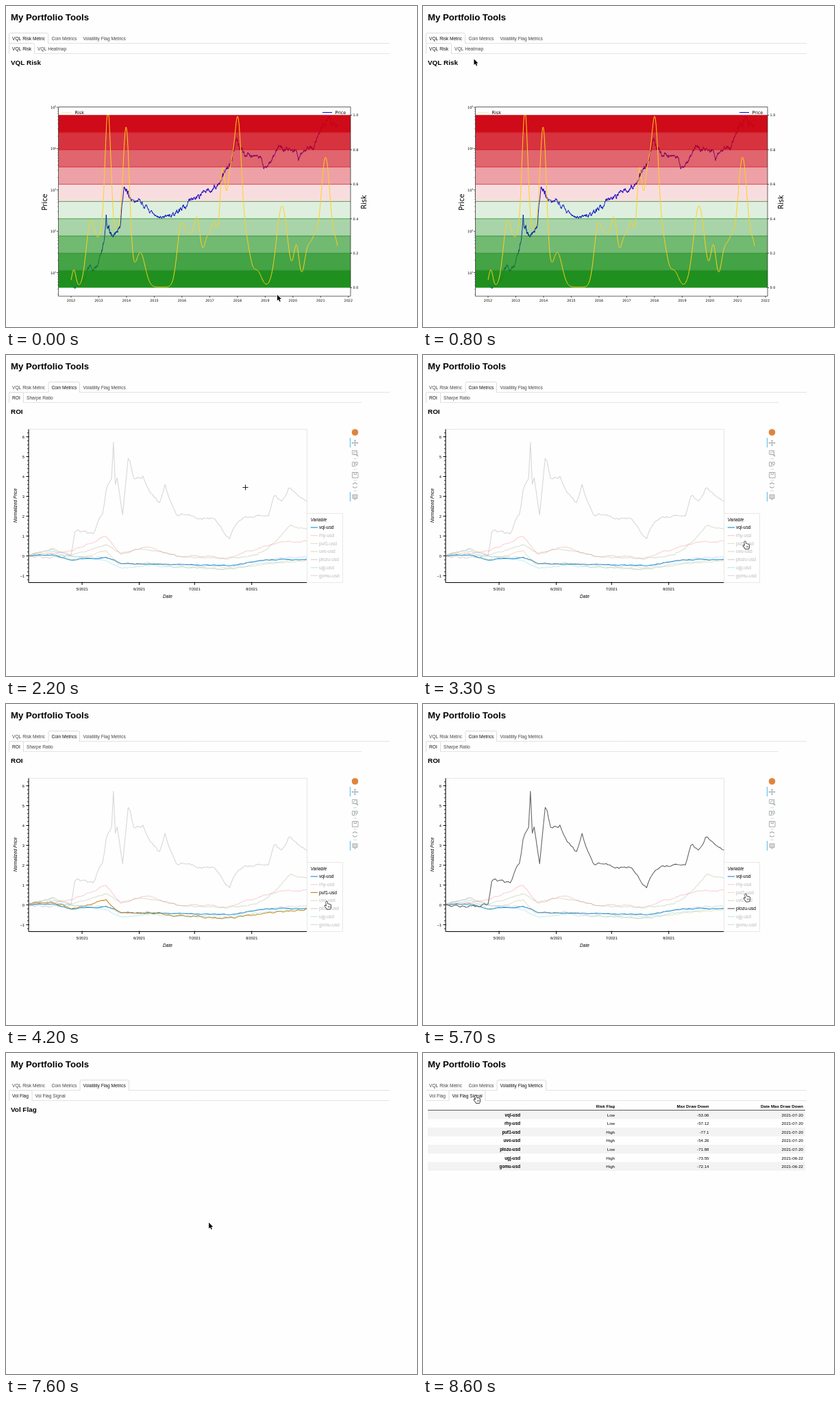
These frames come from a looping animation (600 px wide and 469 px high, 9.4 s). An HTML page with a canvas:

```html
<!DOCTYPE html>
<html lang="en">
<head>
<meta charset="utf-8">
<title>My Portfolio Tools</title>
<style>
  html, body { margin: 0; width: 100%; height: 100%; overflow: hidden; background: #fff; }
  canvas { display: block; width: 600px; height: 469px; }
</style>
</head>
<body>
<canvas id="stage"></canvas>
<script>
const LOOP = 9400, STEP = 100;
const SANS = '"Liberation Sans", Arial, sans-serif';
const PLOT = { font: '"DejaVu Sans", sans-serif' };
const canvas = document.getElementById('stage');
const ctx = canvas.getContext('2d');
const dpr = window.devicePixelRatio || 1;
canvas.width = 600 * dpr;
canvas.height = 469 * dpr;

// ---- helpers ----
const clamp = v => Math.max(0, Math.min(1, v));
const ease = u => u * u * (3 - 2 * u);

function text(s, x, y, size, o = {}) {
  ctx.font = `${o.style || ''} ${size}px ${o.font || SANS}`;
  ctx.textAlign = o.align || 'left';
  ctx.fillStyle = o.color || '#000';
  ctx.fillText(s, x, y);
}
function vtext(s, x, y, size, o) {
  ctx.save();
  ctx.translate(x, y);
  ctx.rotate(-Math.PI / 2);
  text(s, 0, 0, size, { align: 'center', ...o });
  ctx.restore();
}
function path(pts, color, width) {
  ctx.strokeStyle = color;
  ctx.lineWidth = width;
  ctx.lineJoin = 'round';
  ctx.beginPath();
  pts.forEach(([x, y]) => ctx.lineTo(x, y));
  ctx.stroke();
}
function line(x1, y1, x2, y2, color = '#000', width = 1) {
  path([[x1, y1], [x2, y2]], color, width);
}
function rect(x, y, w, h, fill, stroke, width = 1) {
  if (fill) { ctx.fillStyle = fill; ctx.fillRect(x, y, w, h); }
  if (stroke) { ctx.strokeStyle = stroke; ctx.lineWidth = width; ctx.strokeRect(x, y, w, h); }
}
function circle(x, y, r, fill, stroke) {
  ctx.beginPath();
  ctx.arc(x, y, r, 0, 7);
  if (fill) { ctx.fillStyle = fill; ctx.fill(); }
  if (stroke) { ctx.strokeStyle = stroke; ctx.stroke(); }
}
function random(seed) {
  return () => {
    seed = (seed + 0x6d2b79f5) | 0;
    let t = Math.imul(seed ^ (seed >>> 15), 1 | seed);
    t = (t + Math.imul(t ^ (t >>> 7), 61 | t)) ^ t;
    return ((t ^ (t >>> 14)) >>> 0) / 4294967296;
  };
}
// Noise that drifts back to zero; keep sets its memory.
function wander(seed, keep, size) {
  const rnd = random(seed);
  let d = 0;
  return () => d = d * keep + (rnd() - .5) * size;
}
function between(keys, x) {
  let i = 0;
  while (i < keys.length - 2 && x > keys[i + 1][0]) i++;
  const [[x0, y0], [x1, y1]] = [keys[i], keys[i + 1]];
  return y0 + (y1 - y0) * clamp((x - x0) / (x1 - x0));
}

// ---- price and risk ----
// Turning points: years after 2000, log10 of price.
const turns = [
  [12, .73], [12.13, .66], [12.45, .74], [12.62, 1.08], [12.95, 1.13], [13.2, 1.72], [13.27, 2.32],
  [13.31, 2.02], [13.52, 1.9], [13.77, 2.13], [13.91, 3.05], [14.28, 2.66], [14.42, 2.79], [15.03, 2.34],
  [15.66, 2.38], [16.46, 2.82], [17.25, 3.06], [17.72, 3.6], [17.96, 4.26], [18.1, 3.93], [18.86, 3.8],
  [18.95, 3.54], [19.1, 3.56], [19.48, 4.06], [20.12, 3.95], [20.2, 3.72], [20.35, 3.94], [20.75, 4.04],
  [21.02, 4.56], [21.28, 4.78], [21.4, 4.55], [21.61, 4.6]
];
// Risk is a sum of bells: centre x, width, height.
const bells = [
  [99, 3, .1], [123, 6, .36], [138, 7, .26], [149, 4.5, .92], [162, 6, .3], [175.5, 5, .9], [196, 7, .2],
  [256, 6, .36], [268, 5, .23], [279, 5, .38], [293, 5, .25], [304, 5, .35], [316, 4, .62], [327, 5, .57],
  [338.5, 5.5, .92], [351, 6, .24], [367, 6, .09], [403, 8, .47], [424, 4, .23], [440, 5, .2],
  [450, 5, .22], [466.5, 7.3, .75], [483, 5, .2]
];
const riskAt = x => Math.min(1, bells.reduce((s, [c, w, h]) => s + h * Math.exp(-(((x - c) / w) ** 2) / 2), .004));
const yearX = yr => 95 + 40.48 * (yr - 12);
const logY = v => 148 + (5 - v) * 60.4;
const riskY = v => 411.6 - v * 252;

const days = [], jitter = wander(7, .88, .06);
for (let yr = 12; yr < 21.61; yr += 1 / 180) {
  const risk = riskAt(yearX(yr));
  days.push({ yr, risk, y: logY(between(turns, yr) + jitter() * (.7 + risk)) });
}
function jet(v) {
  const c = k => Math.round(255 * clamp(1.5 - Math.abs(4 * v - k)));
  return `rgb(${c(3)},${c(2)},${c(1)})`;
}

// ---- coins ----
const dayX = d => 33 + 2.692 * d;
const stamps = [33, 68, 95, 146, 168, 205, 250, 327, 366, 396, 414, 439];
const shared = ys => ys.map((y, i) => [stamps[i], y]);
const coin = (name, color, sharpe, keys, i) => ({ name, color, sharpe, keys });
const coins = [
  coin('vql-usd', '#1f98d4', -.2, shared([293, 292, 299, 296, 304, 305, 306, 308, 301, 299, 299, 299])),
  coin('rhy-usd', '#f8464e', 1.43, shared([294, 291, 286, 265, 291, 280, 294, 296, 283, 274, 273, 273])),
  coin('puf1-usd', '#cc8a1c', .435, shared([291, 289, 299, 286, 306, 304, 309, 313, 307, 304, 303, 300])),
  coin('uvo-usd', '#6d904f', 1.815, shared([292, 284, 293, 276, 290, 283, 294, 297, 292, 271, 250, 255])),
  coin('plozu-usd', '#666666', 1.98, [
    [33, 294], [80, 296], [95, 292], [101, 255], [128, 263], [136, 238], [141, 234], [147, 192], [154, 184],
    [156.8, 127], [159.5, 190], [162, 177], [170, 236], [179, 147], [187, 184], [200, 178], [210, 198],
    [224, 218], [232, 188], [237, 207], [249, 232], [305, 240], [326, 267], [333, 248], [350, 239],
    [383, 234], [392, 203], [403, 215], [413, 194], [440, 215]]),
  coin('ugj-usd', '#17becf', .5, shared([293, 287, 295, 300, 311, 307, 310, 312, 306, 302, 301, 297])),
  coin('gomu-usd', '#94759e', .56, shared([293, 283, 294, 296, 306, 304, 307, 310, 303, 298, 295, 295]))
];
coins.forEach((c, i) => {
  const calm = i === 0 ? 1.2 : 2.2, noise = wander(31 + i, .6, i === 4 ? 4 : calm);
  c.line = Array.from({ length: 152 }, (_, d) => [dayX(d), between(c.keys, dayX(d)) + noise()]);
});

// ---- page frame ----
const mainTabs = [['VQL Risk Metric', 4.5, 61.5], ['Coin Metrics', 62, 107.5], ['Volatility Flag Metrics', 108, 179.5]];
const subTabs = [
  [['VQL Risk', 4.5, 41.5], ['VQL Heatmap', 41.5, 92.5]],
  [['ROI', 4.5, 25.5], ['Sharpe Ratio', 25.5, 73.5]],
  [['Vol Flag', 4.5, 38], ['Vol Flag Signal', 38, 91]]
];
function tabRow(tabs, active, top, right) {
  const base = top + 15;
  line(4.5, base, right, base, '#e4e4e4');
  tabs.forEach(([name, l, r], i) => {
    if (i === active) {
      ctx.beginPath();
      ctx.roundRect(l, top, r - l, 15, [2, 2, 0, 0]);
      ctx.fillStyle = '#fff';
      ctx.strokeStyle = '#dadddd';
      ctx.lineWidth = 1;
      ctx.fill();
      ctx.stroke();
      line(l + .5, base, r - .5, base, '#fff');
    }
    text(name, l + 4.5, top + 10, 6.65, { color: i === active ? '#111' : '#444' });
  });
}
function page(group, sub) {
  text('My Portfolio Tools', 7, 21, 13.2, { style: 'bold' });
  tabRow(mainTabs, group, 39.5, 560);
  tabRow(subTabs[group], sub, 54.5, group === 1 ? 519 : 560);
  if (group !== 2 || sub === 0) text(subTabs[group][sub][0], 7, 85.5, 9.9, { style: 'bold' });
}

// ---- views ----
function logAxis(right, x0, perYear) {
  rect(76.5, 147.5, right - 76.5, 276.5, null, '#222', .7);
  for (let e = 1; e <= 5; e++) {
    line(74, logY(e), 76, logY(e), '#000', .7);
    text('10', 71.3, logY(e) + 2, 4.9, { ...PLOT, align: 'right' });
    text(e, 71.3, logY(e) + .1, 3.4, PLOT);
  }
  for (let e = 0; e < 5; e++)
    for (let m = 2; m < 10; m++) {
      const y = logY(e + Math.log10(m));
      if (y < 424) line(75, y, 76.5, y, '#333', .5);
    }
  for (let i = 0; i <= 10; i++) {
    const x = x0 + perYear * i;
    line(x, 424, x, 426, '#000', .7);
    text(2012 + i, x, 431.8, 4.9, { ...PLOT, align: 'center' });
  }
}
function unitTicks(x, yOf) {
  for (let v = 0; v <= 5; v++) {
    const y = yOf(v / 5);
    line(x, y, x + 2, y, '#000', .7);
    text((v / 5).toFixed(1), x + 3.6, y + 1.8, 4.9, PLOT);
  }
}
function riskView() {
  path(days.map(d => [yearX(d.yr), d.y]), '#0000dc', 1);
  const alpha = [.13, .37, .6, .8, .96];
  for (let i = 0; i < 10; i++) {
    const low = i < 5, base = low ? '22,140,22' : '206,0,16';
    const y = riskY((i + 1) / 10);
    rect(76.5, y, 426.5, 25.2, `rgba(${base},${alpha[low ? 4 - i : i - 5]})`);
    line(76.5, y, 503, y, low ? 'rgba(10,120,20,.8)' : 'rgba(206,0,16,.8)', .8);
  }
  const risk = [];
  for (let x = 95; x <= 484; x += .5) risk.push([x, riskY(riskAt(x))]);
  path(risk, '#ffd21a', 1);
  logAxis(503, 95, 40.48);
  unitTicks(503, riskY);
  line(81, 155.5, 95, 155.5, '#ffe680', .8);
  text('Risk', 100.5, 157.6, 6.5, PLOT);
  line(462, 155.5, 476, 155.5, '#0000dc', 1);
  text('Price', 480.5, 157.6, 6.5, PLOT);
  vtext('Price', 60, 286.5, 10, PLOT);
  vtext('Risk', 525.5, 286.5, 10, PLOT);
}
function heatView() {
  days.forEach(d => circle(91 + 32.4 * (d.yr - 12), d.y, 1.75, jet(d.risk)));
  logAxis(417, 91, 32.4);
  const g = ctx.createLinearGradient(0, 424, 0, 147.5);
  for (let i = 0; i <= 32; i++) g.addColorStop(i / 32, jet(i / 32));
  rect(439, 147.5, 13.5, 276.5, g, '#222', .6);
  unitTicks(452.5, v => 424 - 276.5 * v);
}
function toolbar(y) {
  const g = '#a1a6a9', x = 509.5;
  circle(x, y, 4.8, '#e0843c');
  for (const d of [8, 87]) line(502.5, y + d, 502.5, y + d + 14, '#6fc0e6', 1.2);
  for (let i = 0; i < 4; i++) line(x - 2, y + 38.5 + 15.7 * i, x + 2.5, y + 38.5 + 15.7 * i, '#ccc', .8);
  // pan
  for (let i = 0; i < 4; i++) {
    ctx.save();
    ctx.translate(x, y + 15.5);
    ctx.rotate(i * Math.PI / 2);
    line(0, 0, 4, 0, g);
    path([[3, -1.5], [4.5, 0], [3, 1.5]], g, .9);
    ctx.restore();
  }
  // box zoom
  rect(x - 4, y + 26.5, 7, 6, null, g, .8);
  circle(x + .5, y + 30.5, 2.5, null, g);
  line(x + 2, y + 32.5, x + 4.5, y + 35, g, 1.4);
  // wheel zoom
  rect(x - 4, y + 43.5, 3, 6, null, g, .9);
  rect(x + .5, y + 43.5, 3.2, 3.2, null, g, .9);
  line(x, y + 50, x + 3, y + 47.5, g);
  // save
  rect(x - 4, y + 58.5, 8.5, 8, null, g, .9);
  rect(x - 1.5, y + 58.5, 3.5, 3, null, g, .9);
  // reset
  for (const s of [0, Math.PI]) {
    ctx.lineWidth = 1.1;
    ctx.beginPath();
    ctx.arc(x, y + 77.5, 3.5, s + .4, s + 2.7);
    ctx.stroke();
  }
  // hover
  rect(x - 3.5, y + 91, 7, 5.5, '#d5d8da', g, .8);
  path([[x - 1.5, y + 97], [x, y + 99], [x + 1.5, y + 97]], g, .9);
}
function linearAxis(left, top, right, bottom, zero, unit, lo, hi, step) {
  rect(left, top, right - left, bottom - top, null, '#e5e5e5');
  line(left, top, left, bottom);
  line(left, bottom, right, bottom);
  for (let k = lo; k <= hi; k++) {
    const y = zero - unit * k * step / 5;
    if (k % 5) { line(left - 2, y, left, y, '#000', .8); continue; }
    line(left - 3.5, y, left + 1, y);
    text(String(k / 5 * step).replace('-', '\u2212'), left - 6, y + 2, 5.7, { align: 'right' });
  }
}
function roiView(t) {
  const on = i => i === 0 || i === 2 && t >= 3800 && t < 5600 || i === 4 && t >= 5100;
  linearAxis(33, 108.5, 439.5, 332.5, 293.5, 29, -6, 31, 1);
  coins.forEach((c, i) => {
    ctx.globalAlpha = on(i) ? 1 : .25;
    path(c.line, c.color, 1.1);
  });
  ctx.globalAlpha = 1;
  [29, 60, 90, 121].forEach((d, i) => {
    line(dayX(d), 331.5, dayX(d), 336);
    text(`${i + 5}/2021`, dayX(d), 343.5, 5.6, { align: 'center' });
  });
  text('Date', 236, 354.7, 6.6, { style: 'italic', align: 'center' });
  vtext('Normalized Price', 15.5, 220, 6.6, { style: 'italic' });
  rect(439.5, 231.5, 52, 101, 'rgba(255,255,255,.95)', '#e8e8e8');
  text('Variable', 444.7, 243.3, 6.5, { style: 'italic' });
  coins.forEach((c, i) => {
    const y = 252 + 11.72 * i;
    ctx.globalAlpha = on(i) ? 1 : .28;
    line(444.7, y, 455, y, c.color, 1.2);
    text(c.name, 457, y + 2.2, 6.7);
  });
  ctx.globalAlpha = 1;
  toolbar(113);
}
function sharpeView() {
  text('Sharp Ratio', 33.7, 114.3, 8, { style: 'bold' });
  linearAxis(33.5, 118.5, 502, 344.5, 308.3, 86, -4, 22, .5);
  coins.forEach((c, i) => {
    const x = 67 + 66.93 * i, h = c.sharpe * 86;
    rect(x - 26.8, 308.3 - h, 53.6, h, '#309fd2', '#101c24', .9);
    line(x, 343.5, x, 348);
    text(c.name, x, 354.6, 5.8, { align: 'center' });
  });
  vtext('Sharpe Ratio', 15.5, 231.5, 6.5, { style: 'italic' });
  toolbar(123.5);
}
const flags = [
  ['Low', '-53.06'], ['Low', '-57.12'], ['High', '-77.1'], ['High', '-54.26'],
  ['Low', '-71.88'], ['High', '-73.55'], ['High', '-72.14']
];
function tableView() {
  const r = { align: 'right' }, b = { ...r, style: 'bold' };
  const row = (cells, y, o) => cells.forEach((s, i) => text(s, 280 + 137.5 * i, y, 6.15, o));
  row(['Risk Flag', 'Max Draw Down', 'Date Max Draw Down'], 79.8, b);
  flags.forEach((cells, i) => {
    const y = 84 + 12.57 * i;
    if (i % 2 === 0) rect(7, y, 551, 12.57, '#f3f3f3');
    text(coins[i].name, 142, y + 8.7, 6.3, b);
    row([...cells, i < 5 ? '2021-07-20' : '2021-06-22'], y + 8.7, r);
  });
  line(7, 83.6, 558, 83.6, '#444', .9);
}

// ---- pointer ----
// Each glide: start, end, x, y.
const glides = [
  [100, 900, 60, 62], [1200, 1500, 85, 47], [1700, 2200, 349.5, 193.5], [2300, 2700, 470, 299],
  [3100, 3400, 470, 263], [3500, 3700, 468, 275], [4000, 4200, 468, 288.5], [4600, 5000, 470, 298],
  [5200, 5500, 471, 277.5], [5800, 6300, 58.5, 58], [6800, 7100, 140, 47], [7300, 7700, 325, 285],
  [7700, 7800, 150, 193], [7900, 8300, 77, 62]
];
function pointerAt(t) {
  let x = 396, y = 422;
  for (const [from, to, gx, gy] of glides) {
    const u = ease(clamp((t - from) / (to - from)));
    x += (gx - x) * u;
    y += (gy - y) * u;
  }
  return [x, y];
}
function shape(pts, fill, stroke, width) {
  path([...pts, pts[0]], stroke, width);
  ctx.fillStyle = fill;
  ctx.fill();
}
const arrow = [[0, 0], [0, 8.6], [2, 6.8], [3.4, 10], [4.8, 9.4], [3.4, 6.3], [6, 6.1]];
const hand = [
  [-.9, .6], [0, 0], [.8, .6], [1.3, 3.5], [5.3, 4.4], [6.4, 5.4],
  [6.2, 8.6], [5.4, 11], [1, 11.2], [-2.7, 6.4], [-2, 5.7], [-.2, 6.7]
];
function pointer(t, view) {
  const [x, y] = pointerAt(t), roi = view === roiView;
  ctx.save();
  ctx.translate(x, y);
  if (y > 38 && y < 70 || roi && x > 439 && y > 231) {
    shape(hand, '#fff', '#111', 1.4);
    for (const d of [2.4, 3.7, 5]) line(d, 6.5, d, 9.2, '#333', .5);
  } else if (roi && x < 439 && y > 108) {
    line(-4, 0, 4, 0, '#222');
    line(0, -4, 0, 4, '#222');
  } else {
    shape(arrow, '#000', '#fff', 1.4);
  }
  ctx.restore();
}

// ---- timeline ----
// Start, tab group, tab, view.
const scenes = [
  [0, 0, 0, riskView], [1100, 0, 1, heatView], [1600, 1, 0, roiView],
  [6500, 1, 1, sharpeView], [7200, 2, 0, () => {}], [8500, 2, 1, tableView]
];
function draw(t) {
  const [, group, sub, view] = scenes.filter(s => t >= s[0]).pop();
  ctx.setTransform(dpr, 0, 0, dpr, 0, 0);
  rect(0, 0, 600, 469, '#fefefe');
  page(group, sub);
  view(t);
  pointer(t, view);
}
let last = -1;
const start = performance.now();
function tick() {
  const t = Math.floor((performance.now() - start) % LOOP / STEP) * STEP;
  if (t !== last) draw(last = t);
  requestAnimationFrame(tick);
}
tick();
</script>
</body>
</html>
```
